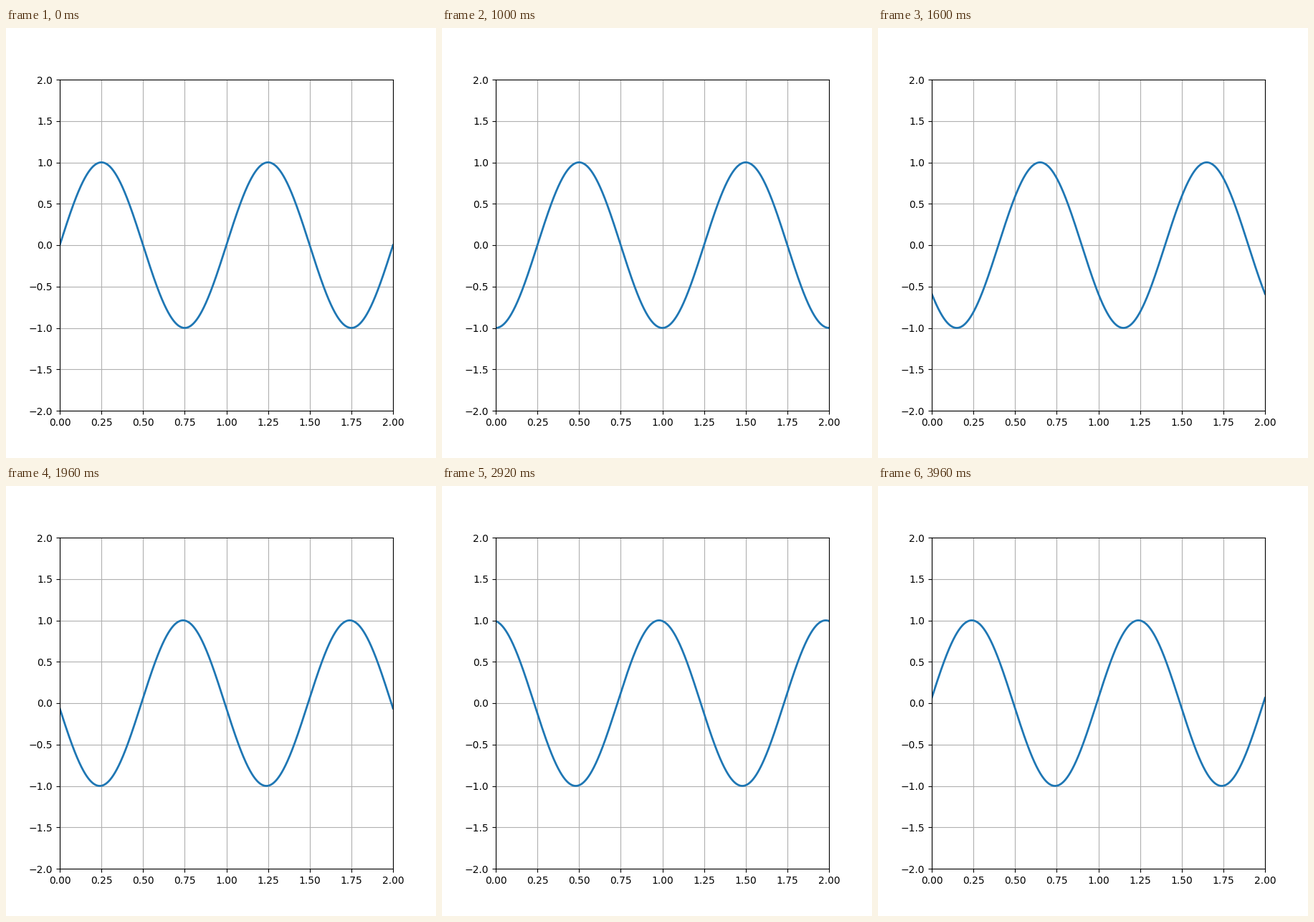
A matplotlib script that plays this animation: 600x600 px, repeating every 4 s.

```python
import numpy as np
import matplotlib.pyplot as plt
from matplotlib.animation import FuncAnimation

FRAMES = 100
INTERVAL = 40  # ms

fig, ax = plt.subplots(figsize=(6, 6), dpi=100)
ax.set_xlim(0, 2)
ax.set_ylim(-2, 2)
ax.grid(True)

x = np.linspace(0, 2, 1000)
line, = ax.plot([], [], lw=2)


def update(i):
    # The wave travels one full wavelength to the right per loop.
    line.set_data(x, np.sin(2 * np.pi * (x - i / FRAMES)))
    return line,


def init():
    return update(0)


anim = FuncAnimation(fig, update, frames=FRAMES, init_func=init,
                     interval=INTERVAL, blit=False, repeat=True)

plt.show()
```
